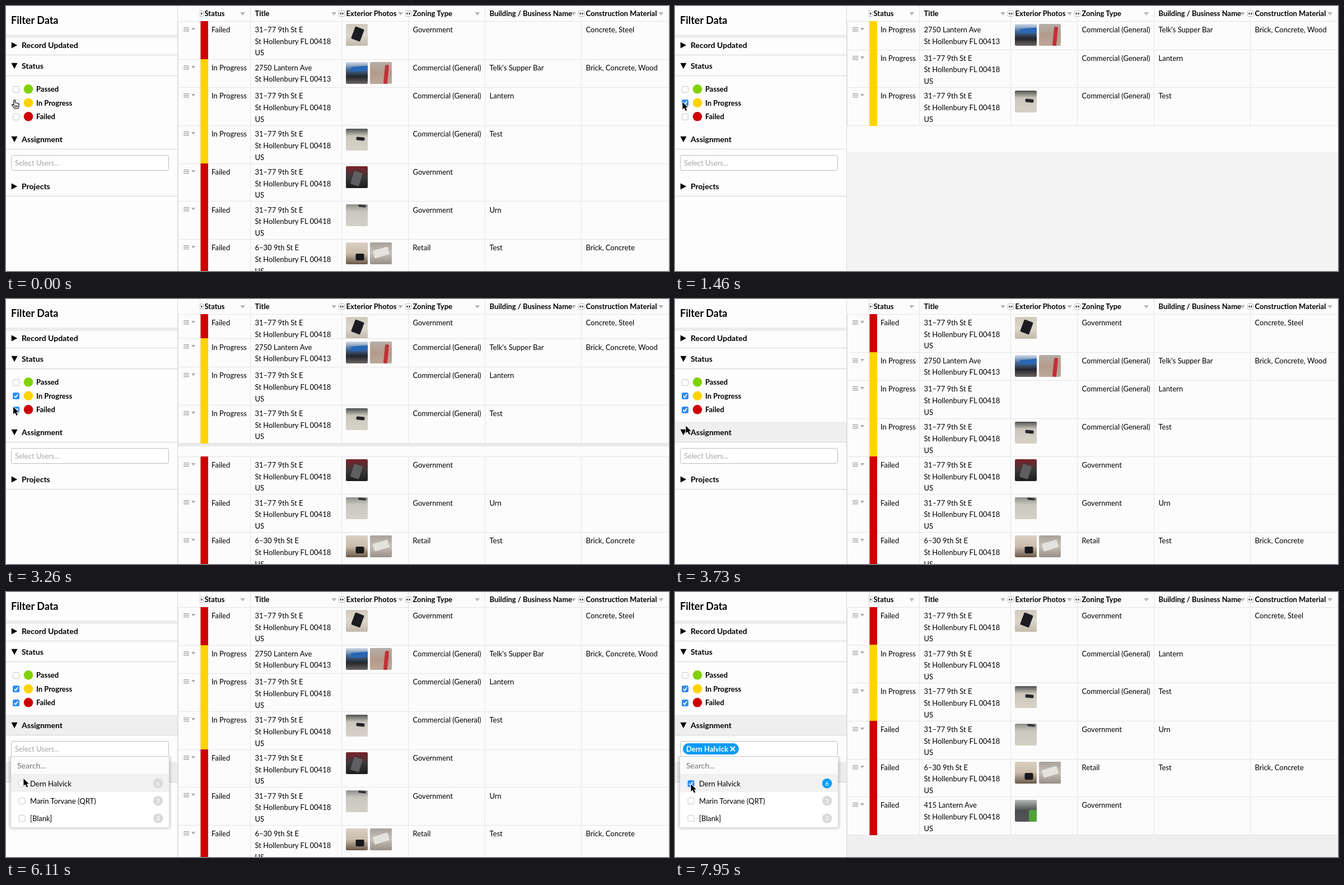
Recreate the animation shown at these times as an HTML page with a canvas. Size 1184x473 px, loop 8 s.

```html
<!DOCTYPE html>
<html lang="en">
<head>
<meta charset="utf-8">
<title>Filter Data</title>
<style>
html, body { margin: 0; width: 100%; height: 100%; overflow: hidden; background: #fdfdfd; }
canvas { display: block; }
</style>
</head>
<body>
<canvas id="stage" width="1184" height="473"></canvas>
<script>
const c = document.getElementById('stage').getContext('2d');
c.textRendering = 'optimizeLegibility';
const LOOP = 8000, TICK = 118.7, TOP = 27.3, TALL = 67.7, SHORT = 50.8;
const RED = '#cc0000', YELLOW = '#ffd200', GREEN = '#80d200', BLUE = '#0a9cf6';
const LINE = '#e4e4e4', PAPER = '#fcfcfc';
const COLS = [346, 436, 599, 718, 855, 1027, 1183];

// ---- helpers
const ramp = (t, a, b) => Math.min(1, Math.max(0, (t - a) / (b - a)));
const ease = p => p * p * (3 - 2 * p);
const mix = (a, b, p) => a + (b - a) * p;
const stepped = t => Math.floor((t - 40) / TICK) * TICK + 40;

function box(x, y, w, h, fill) { c.fillStyle = fill; c.fillRect(x, y, w, h); }
function text(s, x, y, size = 13, weight = 400, fill = '#000', align = 'left') {
  c.font = `${weight} ${size}px Lato, sans-serif`;
  c.fillStyle = fill;
  c.textAlign = align;
  c.fillText(s, x, y);
}
function trace(p) {
  c.beginPath();
  for (let i = 0; i < p.length; i += 2) c.lineTo(p[i], p[i + 1]);
}
function poly(fill, ...p) { trace(p); c.fillStyle = fill; c.fill(); }
function stroke(color, width, ...p) {
  trace(p);
  c.strokeStyle = color;
  c.lineWidth = width;
  c.stroke();
}
// isosceles triangle centred on x, y; turn 0 points down
function tri(x, y, w, h, fill, turn = 0) {
  c.save();
  c.translate(x, y);
  c.rotate(turn * Math.PI / 2);
  poly(fill, -w / 2, -h / 2, w / 2, -h / 2, 0, h / 2);
  c.restore();
}
function round(x, y, w, h, r, fill, line) {
  c.beginPath();
  c.roundRect(x, y, w, h, r);
  if (fill) { c.fillStyle = fill; c.fill(); }
  if (line) { c.strokeStyle = line; c.lineWidth = 1; c.stroke(); }
}
const disc = (x, y, r, fill) => round(x - r, y - r, 2 * r, 2 * r, r, fill);

// ---- thumbnails: a soft backdrop and one tilted slab
const PHOTOS = {
  phone: ['#cfc8bc #ddd6cb #c2b8ab', '#1b1c22', 21, 18, 17, 23, .36],
  shop: ['#d3dce8 #4a6f9f #22252b #6b6560', '#2867b4', 25, 12, 32, 9, -.08],
  porch: ['#b3aea8 #b59a8b #bda899', '#c2313a', 29, 22, 7, 34, .1],
  cables: ['#4d514c #c9c5bb #d3cec4 #d6d1c6', '#26272a', 26, 18, 15, 6, .1],
  bag: ['#7a232b #3a3839 #1c1c1d', '#5f5f61', 19, 22, 16, 24, .3],
  desk: ['#8f908d #c9c7be #cfccc3 #d3d0c6', '#34363a', 29, 3, 14, 4, .1],
  laptop: ['#d9cfc3 #cbbcab #6b5848', '#17181b', 25, 26, 15, 12, 0],
  keyboard: ['#a8a29a #c4bfb7 #989087', '#e4e2dd', 20, 18, 28, 14, -.3],
  office: ['#b7b9b9 #4a4b4e #56575a', '#4fa137', 34, 29, 18, 22, 0]
};
function photo(name, x, y) {
  const [tones, color, sx, sy, w, h, tilt] = PHOTOS[name];
  const g = c.createLinearGradient(0, 0, 0, 39);
  tones.split(' ').forEach((tone, i, all) => g.addColorStop(i / (all.length - 1), tone));
  c.save();
  c.translate(x, y);
  round(0, 0, 39, 39, 2, g);
  c.clip();
  c.translate(sx, sy);
  c.rotate(tilt);
  round(-w / 2, -h / 2, w, h, 2, color);
  c.restore();
}

// ---- table data
const ADDR = '31–77 9th St E', TOWN = 'St Hollenbury FL 00418', COM = 'Commercial (General)';
const row = (active, title, pics, ...cells) => ({
  state: active ? 'In Progress' : 'Failed', color: active ? YELLOW : RED,
  title, pics, cells, h: title.length > 2 ? TALL : SHORT
});
const at = a => [a, TOWN, 'US'];
const ROWS = [
  row(false, at(ADDR), ['phone'], 'Government', '', 'Concrete, Steel'),
  row(true, ['2750 Lantern Ave', 'St Hollenbury FL 00413'], ['shop', 'porch'], COM, "Telk's Supper Bar", 'Brick, Concrete, Wood'),
  row(true, at(ADDR), [], COM, 'Lantern'),
  row(true, at(ADDR), ['cables'], COM, 'Test'),
  row(false, at(ADDR), ['bag'], 'Government'),
  row(false, at(ADDR), ['desk'], 'Government', 'Urn'),
  row(false, at('6–30 9th St E'), ['laptop', 'keyboard'], 'Retail', 'Test', 'Brick, Concrete'),
  row(false, at('415 Lantern Ave'), ['office'], 'Government')
];
const ACTIVE = ROWS.filter(r => r.color === YELLOW);
const FAILED = ROWS.filter(r => r.color === RED);
const MINE = ROWS.filter(r => !r.pics.includes('shop') && !r.pics.includes('bag'));

function stack(rows, shift = 0) {
  let y = TOP + shift;
  return new Map(rows.map(r => [r, (y += r.h) - r.h]));
}

function drawRow(r, y, bg = PAPER) {
  const top = Math.floor(y), end = Math.floor(y + r.h), base = Math.round(y + 19.6);
  box(307, top, 877, end - top, bg);
  box(307, top, 877, 1, LINE);
  box(307, end, 877, 1, LINE);
  for (const x of [307, ...COLS]) box(x, top, 1, end - top, LINE);
  box(347.5, top, 13.5, end - top + 1, r.color);
  for (let i = 0; i < 3; i++) box(317, top + 11 + i * 3, 10, 1.3, '#a0a0a0');
  tri(334.5, top + 14.2, 7, 4.5, '#aaa');
  text(r.state, 367, base);
  r.title.forEach((s, i) => text(s, COLS[1] + 8.5, Math.round(y + 19.6 + i * 20.7)));
  r.cells.forEach((s, i) => text(s, COLS[i + 3] + 8.5, base));
  r.pics.forEach((p, i) => photo(p, COLS[2] + 8 + i * 43, Math.floor(y + 5.6)));
}
function drawRows(rows, shift, bg) { stack(rows, shift).forEach((y, r) => drawRow(r, y, bg)); }

function table(t) {
  const ground = color => box(307, 28, 877, 445, color);
  ground(PAPER);
  if (t < 1190 || (t >= 3370 && t < 7650)) drawRows(ROWS);
  else if (t < 1310) leaving();
  else if (t < 3140) {
    const shift = t < 1460 ? TALL / 2 : 0;
    box(307, 260, 877, 213, '#f4f4f4');
    if (shift) box(307, 248, 877, 5, '#e9e9e9');
    drawRows(ACTIVE, shift);
  } else if (t < 3370) {
    const shift = TALL * ramp(stepped(t), 3098, 3326), home = stack(ROWS);
    for (const r of FAILED) drawRow(r, home.get(r));
    box(307, 213.5 + shift, 877, 6, '#e9e9e9');
    drawRows(ACTIVE, shift);
  } else {
    const p = t < 7770 ? 0 : t < 7950 ? .5 : 1;
    const from = stack(ROWS), to = stack(MINE);
    ground('#efefef');
    for (const r of MINE) {
      const y = mix(from.get(r), to.get(r), p);
      if (p < 1) box(307, Math.floor(y + r.h), 877, 2, '#e3e3e3');
      drawRow(r, y);
    }
  }

  function leaving() {
    ground('#f4f4f4');
    box(307, 92, 877, 3, '#e3e3e3');
    c.save();
    c.beginPath();
    c.rect(307, 92, 877, 151);
    c.clip();
    drawRows(ACTIVE, TALL, '#f4f4f4');
    c.restore();
  }
}

function toggle(x) {
  round(x - 4.5, 8.5, 10, 10, 1, '#fff', '#bdbdbd');
  tri(x - 1.8, 13.5, 5, 2.5, '#222', 1);
  tri(x + 2.8, 13.5, 5, 2.5, '#222', 3);
}
function header() {
  box(307, 0, 877, 27, PAPER);
  box(307, 27, 877, 1, LINE);
  for (const x of COLS) box(x, 0, 1, 27, LINE);
  const heads = ['Status', 'Title', 'Exterior Photos', 'Zoning Type',
    'Building / Business Name', 'Construction Material'];
  heads.forEach((s, i) => {
    text(s, COLS[i] + 8.5, 18, 13, 700);
    tri(COLS[i + 1] - 13.3, 14, 9, 6, '#b8b8b8');
  });
  [2, 3, 5].forEach(i => toggle(COLS[i]));
  round(346.5, 8.5, 6, 10, 1, '#fff', '#bdbdbd');
  tri(349.8, 13.5, 5, 2.5, '#222', 3);
}

// ---- sidebar
function check(x, y, mode) {
  if (mode === 'on') {
    round(x, y, 12, 12, 2.5, '#2f8cf4');
    stroke('#fff', 1.8, x + 3, y + 6.2, x + 5.2, y + 8.8, x + 9.3, y + 3);
  } else {
    const down = mode === 'down';
    round(x + .5, y + .5, 11, 11, 2.5, down ? '#d2d2d2' : '#fff', down ? '#a5a5a5' : '#c6c6c6');
  }
}
function section(s, y, open) {
  tri(15, y, 11, 10.5, '#000', open ? 0 : 3);
  text(s, 28, y + 5, 14, 700);
}
const pressed = (t, down, on) => t >= on ? 'on' : t >= down ? 'down' : '';

function sidebar(t) {
  box(0, 0, 306, 473, '#fdfdfd');
  text('Filter Data', 9, 31.5, 18, 700);
  box(0, 51, 306, 6, '#ececec');
  if (t >= 3730) box(0, 219, 306, 36, '#efefef');
  if (t >= 5640) box(0, 303, 306, 37, '#ececec');
  for (const y of [87, 124, 255, 339]) box(0, y, 306, 1, '#d2d2d2');
  section('Record Updated', 70, false);
  section('Status', 107, true);
  section('Assignment', 238, true);
  section('Projects', 322, false);
  const states = [['Passed', GREEN, ''], ['In Progress', YELLOW, pressed(t, 720, 950)],
    ['Failed', RED, pressed(t, 2540, 2780)]];
  states.forEach(([s, color, mode], i) => {
    const y = 148.3 + i * 24.5;
    check(12, Math.floor(y - 5.3), mode);
    disc(40, y, 8.3, color);
    text(s, 54, Math.round(y + 4.7), 13, 700);
  });
  round(9.5, 266.5, 281, 27, 3, '#fff', '#bcbcbc');
  if (t < 7290) text('Select Users...', 16, 285, 13, 400, '#a6a6a6');
  else {
    round(14, 270, 100, 20, 10, BLUE);
    text('Dern Halvick', 20, 284.5, 13, 700, '#fff');
    stroke('#fff', 2, 99, 276, 107, 284);
    stroke('#fff', 2, 107, 276, 99, 284);
  }
  if (t >= 5520) menu(t);
  box(306, 0, 1, 473, '#dadada');
}

function menu(t) {
  c.save();
  c.beginPath();
  c.rect(0, 293, 306, 140);
  c.clip();
  round(4, 288, 292, 137, 7, 'rgba(0,0,0,.05)');
  c.shadowColor = 'rgba(0,0,0,.25)';
  c.shadowBlur = 5;
  round(9, 291, 282, 129, 3, '#fff');
  c.restore();
  box(9, 293, 282, 1, '#c8c8c8');
  box(9, 294, 282, 31, '#fbfbfb');
  box(9, 325, 282, 1, '#eee');
  text('Search...', 20, 314.5, 14, 400, '#757575');
  if (t >= 5990) box(9, 326, 282, 31, '#f1f1f1');
  [['Dern Halvick', 6], ['Marin Torvane (QRT)', 3], ['[Blank]', 3]].forEach(([s, n], i) => {
    const y = 342 + i * 31.2, lit = t >= 7170 && !i;
    check(22.5, Math.floor(y - 6), lit ? 'on' : '');
    text(s, 43, Math.round(y + 4.5));
    disc(271.5, y - .5, 8.7, lit ? BLUE : '#d9d9d9');
    text(n, 271.5, Math.round(y + 3.8), 12, 400, '#fff', 'center');
  });
}

// ---- pointer moves: start, end, x and y of the tip
const MOVES = [
  [1820, 2290, 12.5, 192], [3480, 3950, 25, 258], [3960, 4550, 16, 197.5],
  [4760, 5140, 46, 280], [5400, 6330, 28, 342.5]
];
function pointer(t) {
  let x = 13, y = 171;
  for (const [a, b, nx, ny] of MOVES) {
    const p = ease(ramp(stepped(t), a, b));
    x = mix(x, nx, p);
    y = mix(y, ny, p);
  }
  c.save();
  c.lineJoin = 'round';
  if (t < 120) {
    c.translate(10, 167);
    const hand = [4, 1, 6.3, 1, 7, 6, 10, 6, 13, 8, 13, 12, 11.5, 16, 5, 16, 1, 10.5, 1, 8.5, 4, 10];
    poly('#fff', ...hand);
    stroke('#000', 1.2, ...hand, 4, 1);
    for (let i = 6; i < 12; i += 2) stroke('#000', 1, i, 10, i, 14);
  } else {
    c.translate(x, y);
    const arrow = [.5, .5, .5, 13.5, 3.6, 10.8, 6, 16, 8.3, 15, 6, 10, 10, 10, .5, .5];
    stroke('#fff', 2, ...arrow);
    poly('#000', ...arrow);
  }
  c.restore();
}

const start = performance.now();
function frame() {
  const t = (performance.now() - start) % LOOP;
  header();
  table(t);
  sidebar(t);
  pointer(t);
  requestAnimationFrame(frame);
}
frame();
</script>
</body>
</html>
```
